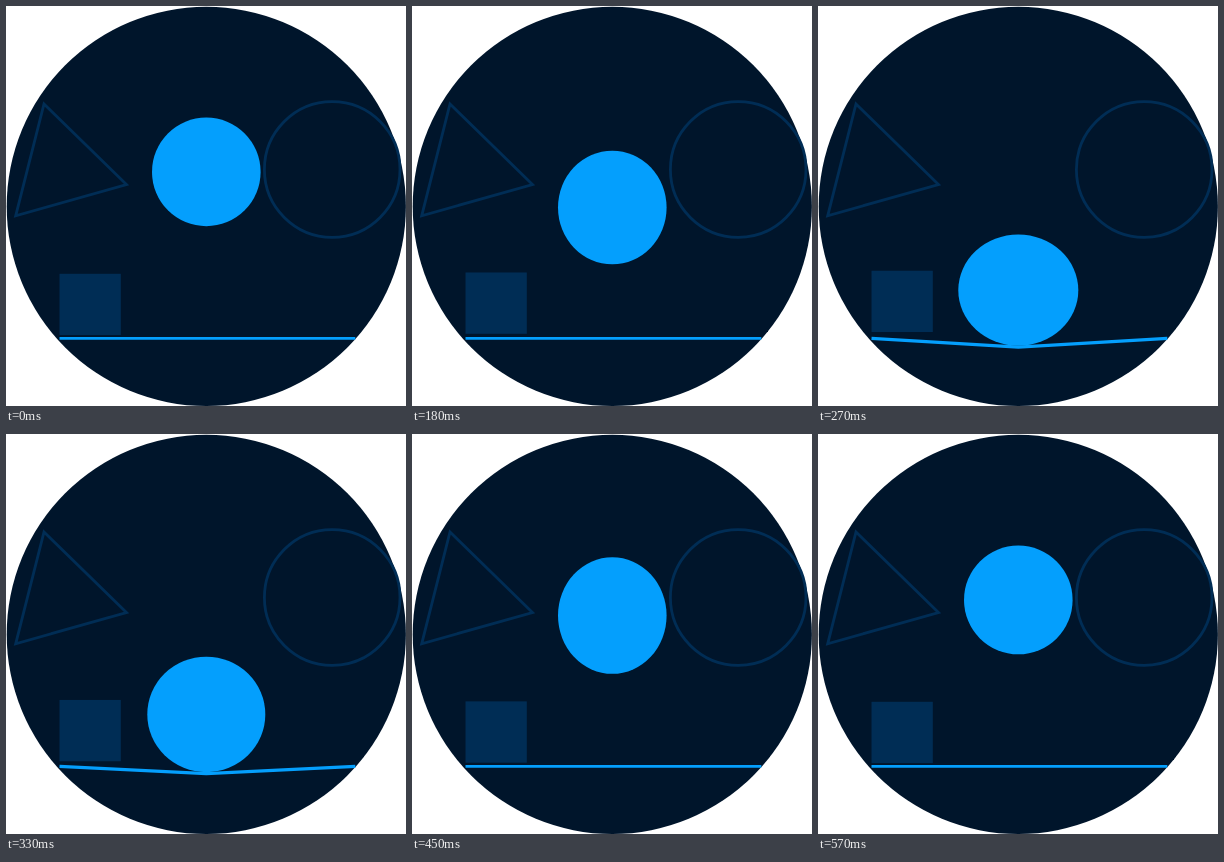
An HTML page that plays this animation: 400 px wide and 400 px high, repeating every 0.6 s.

```html
<!DOCTYPE html>
<html lang="en">
<head>
<meta charset="utf-8">
<title>Bouncing ball</title>
<style>
  html, body { margin: 0; width: 100%; height: 100%; overflow: hidden; background: #fff; }
  svg { display: block; width: 100vw; height: 100vh; }
</style>
</head>
<body>
<svg viewBox="0 0 400 400">
  <circle cx="200.3" cy="200.4" r="199.6" fill="#00152b"/>
  <g fill="none" stroke="#002d55" stroke-width="2.8">
    <path d="M38 98 L120.5 178.5 L9.7 209.8 Z"/>
    <circle cx="326.2" cy="163.5" r="67.8"/>
  </g>
  <rect id="box" x="53.5" width="61.3" height="61.3" fill="#002d55"/>
  <path id="line" fill="none" stroke="#049ffd"/>
  <ellipse id="ball" cx="200.3" fill="#049ffd"/>
</svg>
<script>
const LOOP = 600, STEP = 30;
const HIT = 254, LEAVE = 338;            // the ball touches the line between these times
const TOP = 220.2, TOUCH = 331, SAG = 10.3; // heights of the ball's lowest point
const RADIUS = 54.3, FLOOR = 332.4;
const [box, line, ball] = ["box", "line", "ball"].map(id => document.getElementById(id));

function set(el, attrs) {
  for (const name in attrs) el.setAttribute(name, attrs[name]);
}

// Rises from 0 to 1 until start, falls back to 0 from end on
const swing = (t, start, end) => Math.min(1, t / start, (LOOP - t) / (LOOP - end));

function draw(now) {
  const t = Math.floor((now + 1) % LOOP / STEP) * STEP;
  const fall = swing(t, HIT, LEAVE);
  const press = Math.max(0, Math.sin(Math.PI * (t - HIT) / (LEAVE - HIT))) ** 0.3
    * (t > HIT && t < LEAVE);
  const stretch = 0.25 * fall ** (t < HIT ? 4.9 : 2.2);

  const low = TOP + (TOUCH - TOP) * fall ** 3.1 + SAG * press;
  const ry = RADIUS * (1 + stretch - 0.27 * press);
  set(ball, { rx: RADIUS * (1 + 0.125 * press), ry, cy: low - ry });
  set(line, {
    d: `M53.5 ${FLOOR} L200.3 ${FLOOR + SAG * press} L349.3 ${FLOOR}`,
    "stroke-width": 2.8 + 0.7 * press
  });

  // The box hops slightly when the ball lands
  set(box, { y: 267.8 - 3.3 * swing(t, 260, 260) ** 2.5 });
  requestAnimationFrame(draw);
}
draw(0);
</script>
</body>
</html>
```
